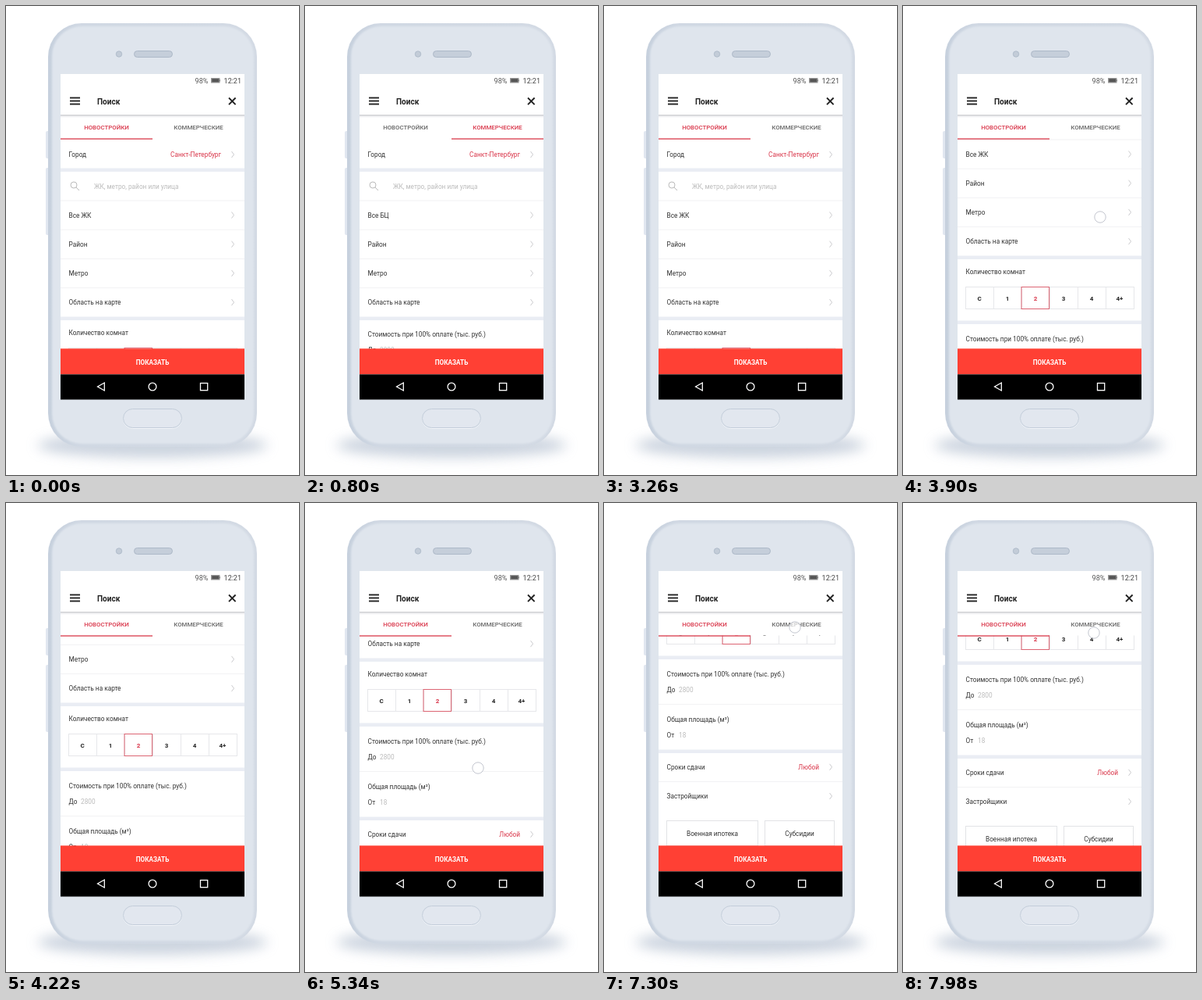
Recreate the animation shown at these times as an HTML page. Size 376 by 600 pixels, loop 8 s.

```html
<!DOCTYPE html>
<html lang="ru">
<head>
<meta charset="utf-8">
<style>
html, body { margin: 0; width: 100%; height: 100%; overflow: hidden; background: #fff; }
svg { display: block; width: 376px; height: 600px; }
text { font: 8.27px Roboto, "Open Sans", sans-serif; fill: #333; }
.line { fill: none; stroke-linecap: butt; }
</style>
</head>
<body>
<svg id="stage" viewBox="0 0 376 600"></svg>
<script>
const LOOP = 8000, PAGE = 236, TAB = 118, RED = '#d9364a';
const stage = document.getElementById('stage');

// Drawing helpers returning SVG markup
const rect = (x, y, w, h, fill, more = '') =>
  `<rect x="${x}" y="${y}" width="${w}" height="${h}" fill="${fill}" ${more}/>`;
const label = (x, y, s, style = '', anchor = 'start') =>
  `<text x="${x}" y="${y + 3}" text-anchor="${anchor}" style="${style}">${s}</text>`;
const path = (d, color, width = 1) =>
  `<path class="line" d="${d}" stroke="${color}" stroke-width="${width}"/>`;
const rule = y => rect(70, y, PAGE, 1, '#f2f2f4');
const band = y => rect(70, y, PAGE, 4.5, '#eaedf4');
const box = (x, y, w, h, color) => rect(x, y, w, h, 'none', `stroke="${color}"`);

const row = (y, name, value = '') =>
  label(80.5, y, name) + label(276, y, value, `fill:${RED}`, 'end') +
  path(`M289.5 ${y - 4}l3 4l-3 4`, '#c4c4c8', .9);
const field = (y, name, prefix, value) =>
  label(80.5, y, name) + label(80.5, y + 20, prefix) +
  label(96, y + 20, value, 'fill:#bbb');

const filters = all =>
  row(190, 'Город', 'Санкт-Петербург') + band(207.5) +
  `<circle cx="87" cy="229" r="4" fill="none" stroke="#bbb"/>` +
  path('M90 232l4 4', '#bbb') +
  label(113, 230.5, 'ЖК, метро, район или улица', 'fill:#bbb') +
  [all, 'Район', 'Метро', 'Область на карте'].map((name, i) =>
    rule(248.5 + 37.2 * i) + row(267.5 + 37.2 * i, name)).join('') +
  band(397.5);

const costs = y =>
  field(y, 'Стоимость при 100% оплате (тыс. руб.)', 'До', '2800') + rule(y + 38) +
  field(y + 58, 'Общая площадь (м²)', 'От', '18') + band(y + 96.5) +
  row(y + 118.8, 'Сроки сдачи', 'Любой') + rule(y + 137) +
  row(y + 156, 'Застройщики');

const rooms = () => {
  const cells = ['С', '1', '2', '3', '4', '4+'].map((s, i) =>
    box(80.5 + 36 * i, 437.5, 36, 28, '#e6e7ea') +
    label(98 + 36 * i, 452, s,
      `font-weight:700;font-size:8px;fill:${i === 2 ? RED : '#222'}`, 'middle'));
  return label(80.5, 417.8, 'Количество комнат') + cells.join('') +
    box(152, 437.5, 35.5, 28, '#dc6573') + band(480.5);
};

const options = () =>
  box(80.5, 691.5, 117, 32, '#e2e3e6') + label(139, 707.5, 'Военная ипотека', '', 'middle') +
  box(206.5, 691.5, 89, 32, '#e2e3e6') + label(251, 707.5, 'Субсидии', '', 'middle');

const page = (x, id, content) => `<g transform="translate(${x})">
  ${rect(70, 140, PAGE, 331, '#fff')}<g id="${id}">${content}</g>
  ${rect(70, 438.3, PAGE, 33, '#ff4034')}
  ${label(188, 455.7, 'ПОКАЗАТЬ', 'font-size:8.2px;font-weight:600;fill:#fff', 'middle')}</g>`;

const phone = `
  <ellipse cx="188" cy="562" rx="148" ry="16" fill="#bfc9d7" opacity=".8" filter="url(#blur)"/>
  ${rect(51, 160, 6, 35, '#e1e7f0', 'rx="2"')}${rect(51, 207, 6, 86, '#e1e7f0', 'rx="2"')}
  ${rect(54, 22, 268, 542, 'url(#rim)', 'rx="43"')}
  ${rect(59, 26, 259, 534, '#dfe5ed', 'rx="38" filter="url(#soft)"')}
  <circle cx="145" cy="61.5" r="3.7" fill="#c3ccd8" stroke="#b0bccb"/>
  ${rect(164.5, 57.5, 49, 8, '#c5ceda', 'rx="4" stroke="#adb9c8"')}
  ${rect(150.5, 516.5, 75, 24, 'none', 'rx="12" stroke="#f3f6fa"')}
  ${rect(150.5, 515.5, 75, 24, '#e2e7ef', 'rx="12" stroke="#c3cdda"')}`;

const header = `
  ${rect(70, 87, PAGE, 54, '#fff')}
  ${label(259.5, 95.5, '98%', 'font-size:9.1px;fill:#555', 'end')}
  ${rect(263, 92, 11.5, 6.5, '#999')}${rect(264.3, 93.2, 8.9, 4.1, '#555')}
  ${rect(274, 94, 1, 2.5, '#888')}
  ${label(302, 95.5, '12:21', 'font-size:9px;fill:#444', 'end')}
  ${[117.5, 121.5, 125.5].map(y => path(`M82 ${y}h13`, '#222', 1.9)).join('')}
  ${label(117, 122.5, 'Поиск', 'font-size:10px;font-weight:700;fill:#222')}
  ${path('M286 117.5l8.6 8.6m0-8.6l-8.6 8.6', '#222', 1.9)}
  ${rect(70, 139, PAGE, 1, '#d2d3d6')}${rect(70, 140, PAGE, 1.3, '#dfe0e3')}
  ${rect(70, 141.3, PAGE, 1.2, '#f3f3f5')}`;

const tabFont = 'font-size:7.85px;font-weight:500';
const tabs = `
  ${rect(70, 140, PAGE, 29.5, '#fff')}
  <g clip-path="url(#tabClip)"><rect id="tint" y="140" width="${TAB}" height="30" fill="#50505f"/>
  <circle id="ripple" fill="#50505f"/></g>
  ${label(129, 155, 'НОВОСТРОЙКИ', tabFont, 'middle').replace('<text', '<text id="tab0"')}
  ${label(247, 155, 'КОММЕРЧЕСКИЕ', tabFont, 'middle').replace('<text', '<text id="tab1"')}
  <rect id="underline" y="169.3" width="${TAB}" height="1.4" fill="#dc4858"/>`;

const nav = rect(70, 471.3, PAGE, 32.2, '#000') +
  path('M126.3 482v10l-8.8-5z', '#fff', 1.3) +
  `<circle class="line" cx="188" cy="487" r="4.9" stroke="#fff" stroke-width="1.3"/>` +
  rect(249.5, 482.5, 9.2, 9.2, 'none', 'stroke="#fff" stroke-width="1.3"');

stage.innerHTML = `<defs>
  <linearGradient id="rim"><stop offset="0" stop-color="#c6d0dd"/>
  <stop offset=".15" stop-color="#d0d8e3"/><stop offset="1" stop-color="#d3dae4"/></linearGradient>
  <filter id="soft"><feGaussianBlur stdDeviation="1.3"/></filter>
  <filter id="blur" x="-20%" y="-150%" width="140%" height="400%"><feGaussianBlur stdDeviation="8"/></filter>
  <clipPath id="screen">${rect(70, 140, PAGE, 331.3, '#000')}</clipPath>
  <clipPath id="tabClip"><rect id="tabArea" y="140" width="${TAB}" height="30"/></clipPath></defs>
  ${phone}
  <g clip-path="url(#screen)"><g id="pager">
    ${page(0, 'list', filters('Все ЖК') + rooms() + costs(504) + options())}
    ${page(PAGE, 'other', filters('Все БЦ') + costs(420))}
  </g>${tabs}</g>
  ${header}${nav}
  <circle id="touch" r="7.2" fill="#fff" fill-opacity=".65" stroke="#c3c6cf"/>`;

const el = id => document.getElementById(id);
const set = (id, attrs) => {
  for (const k in attrs) el(id).setAttribute(k, attrs[k]);
};
const part = (t, start, length) => Math.min(1, Math.max(0, (t - start) / length));
const smooth = p => p * p * (3 - 2 * p);

const TAPS = [
  { at: 20, shown: 20, x: 247, tab: 1 },
  { at: 2000, shown: 1860, x: 138.5, tab: 0 }
];
// A touch moves with the content: y = base - scroll
const DRAGS = [
  { from: 3640, to: 4000, x: 253, base: 348 },
  { from: 5280, to: 5520, x: 222, base: 538 },
  { from: 6820, to: LOOP, x: 245, base: 444 }
];

// Whole pixels keep the thin lines crisp
function scrollAt(t) {
  const fling = 191 * (1 - (1 - part(t, 3640, 1388)) ** 2.5);
  const p = part(t, 5280, 540);
  const back = 1 - (1 - part(t, 6820, 1160)) ** 2;
  return Math.round(fling + 107 * (p + smooth(p)) / 2 - 20 * back);
}

function draw(t) {
  const scroll = scrollAt(t);
  const tap = t < TAPS[1].shown ? TAPS[0] : TAPS[1];
  const active = t >= 20 && t < 2000 ? 1 : 0;

  const settle = at => t < at ? 0 : 1 - Math.exp((at - t) / 43);
  const slide = t < 2000 ? settle(20) : 1 - settle(2000);
  const mark = smooth(part(t, 20, 370)) - smooth(part(t, 2000, 370));
  set('pager', { transform: `translate(${-PAGE * slide})` });
  set('list', { transform: `translate(0 ${-scroll})` });
  set('underline', { x: 70 + TAB * mark });
  [0, 1].forEach(i => el('tab' + i).style.fill = i === active ? RED : '#666');

  const age = part(t, tap.at, 800), fade = age > 0 ? 1 - smooth(age) : 0;
  const left = 70 + TAB * tap.tab;
  set('tabArea', { x: left });
  set('tint', { x: left, opacity: .06 * fade * part(t, tap.at, 80) });
  set('ripple', { cx: tap.x, cy: 156, r: 8 + 96 * age, opacity: .09 * fade });

  let x = tap.x, y = 158, from = tap.shown, to = tap.at + 130;
  const drag = DRAGS.find(d => t >= d.from && t < d.to + 120);
  if (drag) ({ x, from, to } = drag), y = drag.base - scroll;
  const opacity = t >= from ? 1 - part(t, to, 120) : 0;
  set('touch', { cx: x, cy: y, opacity });
}

const began = performance.now();
function tick() {
  draw((performance.now() - began) % LOOP);
  requestAnimationFrame(tick);
}
tick();
</script>
</body>
</html>
```
